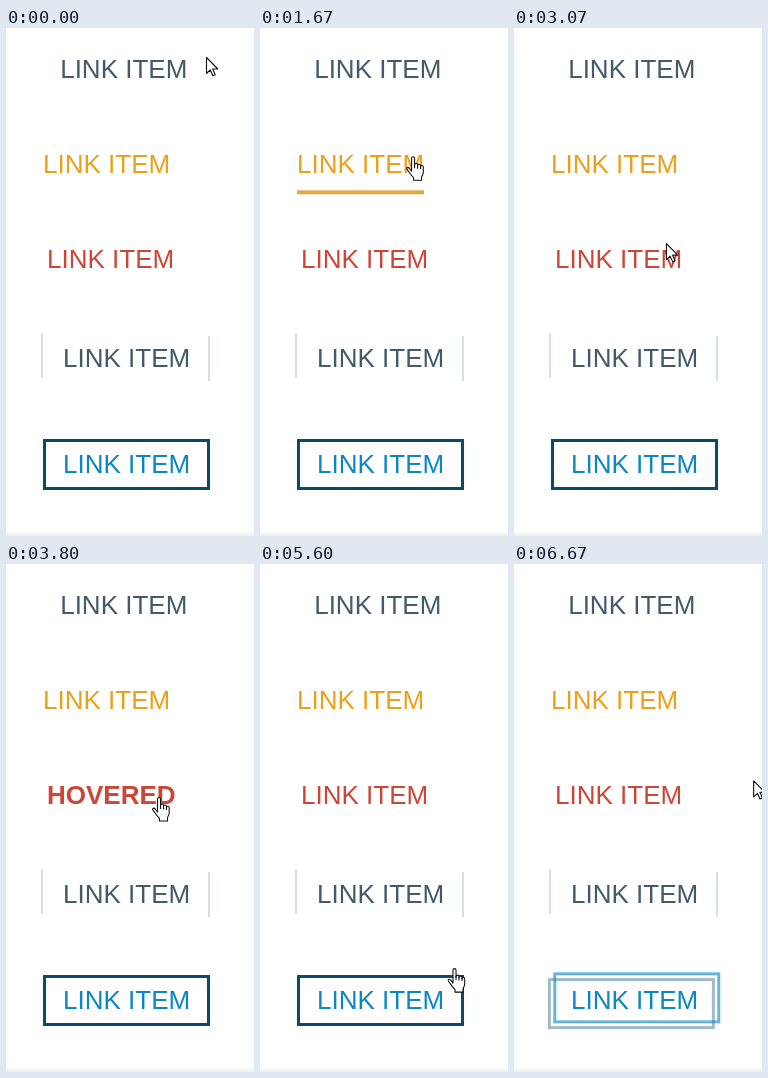
These frames come from a looping animation (248x508 px, 6740 ms). An HTML page:

```html
<!DOCTYPE html>
<html lang="en">
<head>
<meta charset="utf-8">
<title>Link hover effects</title>
<style>
  html, body { margin: 0; width: 100%; height: 100%; overflow: hidden; background: #fff; }
  #stage {
    position: relative; width: 248px; height: 508px; overflow: hidden;
    font: 26px/30px "Liberation Sans", Arial, sans-serif; white-space: pre; color: #435a6b;
  }
  #stage div, #stage svg { position: absolute; }
  #stage::after {
    content: ""; position: absolute; left: 0; right: 0; bottom: 0; height: 6px;
    background: linear-gradient(#fff, #efefef);
  }
  #under { left: 37px; top: 160px; width: 127px; height: 4px; background: #d9920f; }
  #clip { left: 37px; top: 216px; width: 136px; height: 26px; overflow: hidden; color: #cc4537; }
  #slide { left: 4px; top: 0; }
  #slide b { position: absolute; left: 0; top: 100%; }
  .bar { width: 45px; height: 2px; background: #435a6b; }
  #barA { top: 305px; transform-origin: 0 0; }
  #barB { top: 353px; transform-origin: 100% 0; }
  .frame { left: 37px; top: 411px; width: 167px; height: 51px; box-sizing: border-box; border: 3px solid; }
  #frameA { border-color: #0a4a6c; }
  #frameB { border-color: #0a86c6; }
  #stage svg { left: 0; top: 0; overflow: visible; z-index: 2; }
</style>
</head>
<body>
<div id="stage">
  <div id="open" style="left:37px;top:26px">[</div>
  <div style="left:54.2px;top:26px">LINK ITEM</div>
  <div id="close" style="left:191.3px;top:26px">]</div>

  <div style="left:37px;top:121px;color:#eca01a">LINK ITEM</div>
  <div id="under"></div>

  <div id="clip"><div id="slide">LINK ITEM<b>HOVERED</b></div></div>

  <div style="left:57px;top:315px">LINK ITEM</div>
  <div id="barA" class="bar"></div>
  <div id="barB" class="bar"></div>

  <div id="frameA" class="frame"></div>
  <div id="frameB" class="frame"></div>
  <div style="left:57px;top:421px;color:#0a86c6">LINK ITEM</div>

  <svg id="cursor" width="20" height="26" fill="#fff" stroke="#111" stroke-width="1.1" stroke-linejoin="round">
    <path id="arrow" d="M.5 .5V16.5L4.2 13 6.8 18.7 9.2 17.7 6.7 12H11.8Z"/>
    <g id="hand" transform="translate(-7 0)">
      <path d="M5.5 15V2Q5.5 .5 7 .5T8.5 2V9Q8.5 7 10 7T11.5 8.5V9.5Q11.5 8 13 8T14.5 9.5V10.5Q14.5 9.3 15.8 9.3T17.2 10.8V16Q17.2 18 15.5 20.5V24H7.5V21.5Q5 19 3 15.8 .5 13 .6 12 1.5 10.3 3.3 12Z"/>
      <path fill="none" d="M8.5 8V12M11.5 9V12.5M14.5 10V13"/>
    </g>
  </svg>
</div>
<script>
const LOOP = 6740;
const el = id => document.getElementById(id);

// Hover intervals of the five links
const hover = [[140, 1070], [1530, 2690], [3100, 3920], [4400, 5270], [5600, 6600]];

// Pointer path: time, x, y
const path = [
  [0, 200, 29], [70, 200, 29], [400, 178, 36], [730, 172, 43], [1000, 170, 50],
  [1300, 160, 90], [1530, 155, 122], [1900, 151, 134], [2200, 150, 137], [2400, 150, 137],
  [2530, 150, 139], [2800, 151, 180], [3100, 152, 217], [3600, 153, 233], [3800, 153, 233],
  [4100, 169, 270], [4400, 188, 308], [4730, 182, 325], [5000, 182, 325], [5300, 188, 357],
  [5600, 194.5, 404], [5900, 190, 430], [6400, 188, 434], [6530, 192, 425],
  [6600, 204, 400], [6670, 239, 217], [6740, 246, 190]
];

// CSS "ease": cubic-bezier(.25, .1, .25, 1)
function ease(x) {
  if (x <= 0) return 0;
  if (x >= 1) return 1;
  let lo = 0, hi = 1, s = .5;
  for (let i = 0; i < 20; i++) {
    s = (lo + hi) / 2;
    const bx = .75 * s * (1 - s) + s * s * s;
    if (bx < x) lo = s; else hi = s;
  }
  return .3 * s * (1 - s) ** 2 + 3 * s * s * (1 - s) + s ** 3;
}

function shown(i, t, dur = 300) {
  const [on, off] = hover[i];
  return t < off ? ease((t - on) / dur) : 1 - ease((t - off) / dur);
}

// Monotone Hermite interpolation along the path
const rate = (i, k) => (path[i + 1][k] - path[i][k]) / (path[i + 1][0] - path[i][0]);
function slope(i, k) {
  if (i === 0 || i === path.length - 1) return 0;
  const a = rate(i - 1, k), b = rate(i, k);
  return a * b > 0 ? 2 * a * b / (a + b) : 0;
}
function along(t, k) {
  let i = 0;
  while (i < path.length - 2 && path[i + 1][0] <= t) i++;
  const d = path[i + 1][0] - path[i][0], u = (t - path[i][0]) / d, v = 1 - u;
  return path[i][k] * (1 + 2 * u) * v * v + path[i + 1][k] * u * u * (3 - 2 * u)
    + d * u * v * (v * slope(i, k) - u * slope(i + 1, k));
}

function set(id, transform, opacity = 1) {
  const s = el(id).style;
  s.transform = transform;
  s.opacity = opacity;
}

function draw(t) {
  const gap = 20 * (1 - shown(0, t)), fade = shown(0, t, 200);
  set("open", `translateX(${gap}px)`, fade);
  set("close", `translateX(${-gap}px)`, fade);

  const line = shown(1, t);
  set("under", `translateY(${10 * (1 - line)}px)`, line);

  set("slide", `translateY(${-100 * shown(2, t)}%)`);

  const p = shown(3, t), turn = 90 * (1 - p), alpha = .2 + .8 * p;
  el("barA").style.left = 37 + 83.5 * p + "px";
  el("barB").style.left = 159 - 83.5 * p + "px";
  set("barA", `rotate(${turn}deg) translateX(${-50 * p}%)`, alpha);
  set("barB", `rotate(${turn}deg) translateX(${50 * p}%)`, alpha);

  const q = shown(4, t);
  set("frameA", `translate(${-5 * q}px, ${5 * q}px)`, 1 - q);
  set("frameB", `translate(${6 * (1 - q)}px, ${-7 * (1 - q)}px)`, q);

  const over = hover.some(([on, off]) => t >= on && t < off);
  el("hand").style.display = over ? "" : "none";
  el("arrow").style.display = over ? "none" : "";
  set("cursor", `translate(${along(t, 1)}px, ${along(t, 2)}px)`);
}

const start = performance.now();
function tick() {
  draw((performance.now() - start) % LOOP);
  requestAnimationFrame(tick);
}
tick();
</script>
</body>
</html>
```
